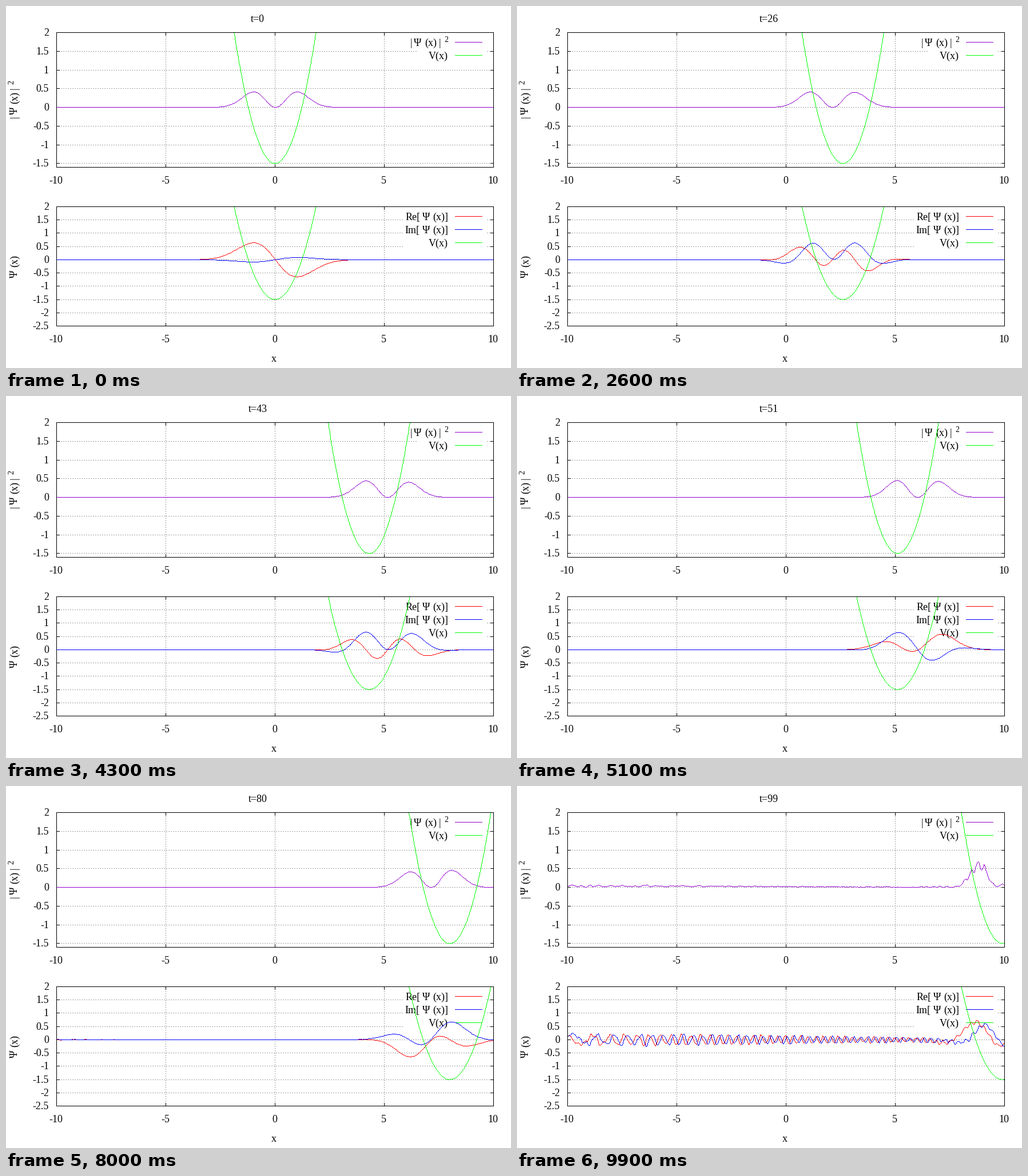
A matplotlib script that plays this animation: 883x634 px, repeating every 10000 ms.

```python
import numpy as np
import matplotlib.pyplot as plt
from matplotlib.animation import FuncAnimation
from matplotlib.colors import to_rgba

W, H, DPI = 883, 634, 64
PX = 72 / DPI                      # one pixel in points
FRAMES, INTERVAL = 100, 100
LEFT, RIGHT = 88, 852
PURPLE, GREEN, RED, BLUE = "#9400d3", "#00ff00", "#ff0000", "#0000ff"
GRID, BLACK = "#a0a0a0", "#000000"

plt.rcParams["font.family"] = "Liberation Serif"


# --- physics: first excited state dragged along by a moving harmonic well ---

N, SPAN, DT, SPEED = 512, 20.0, 0.1, 0.1
x = -SPAN / 2 + SPAN * np.arange(N) / N


def simulate():
    """Split-step evolution, one step per frame."""
    n = np.fft.fftfreq(N, 1 / N)
    n[n < 0] += 1                  # mirrored frequency index N-1-j
    k = 2 * np.pi * n / SPAN
    drift = np.exp(-0.5j * k**2 * DT)
    psi = -np.sqrt(2) * np.pi**-0.25 * x * np.exp(-x**2 / 2) + 0j
    states = []
    for t in range(FRAMES):
        kick = np.exp(-0.25j * (x - SPEED * t)**2 * DT)
        psi = kick * np.fft.ifft(drift * np.fft.fft(kick * psi))
        states.append(psi)
    return states


states = simulate()


# --- hard-edged one-pixel lines on a transparent layer ---

def trace(px, py):
    """Pixels of a polyline, one per step along each segment's longer side."""
    px, py = (np.floor(np.asarray(p) + 0.5) for p in (px, py))
    dx, dy = np.diff(px), np.diff(py)
    steps = np.maximum(np.abs(dx), np.abs(dy)).astype(int)
    seg = np.repeat(np.arange(len(steps)), steps)
    start = np.cumsum(steps) - steps
    frac = (np.arange(len(seg)) - start[seg]) / steps[seg]
    cols = np.append(px[seg] + frac * dx[seg], px[-1])
    rows = np.append(py[seg] + frac * dy[seg], py[-1])
    return (np.floor(cols + 0.5).astype(int),
            np.floor(rows + 0.5).astype(int))


def stroke(layer, px, py, color=BLACK, dashed=False, box=(0, 0, W, H)):
    cols, rows = trace(px, py)
    x0, y0, x1, y1 = box
    keep = (cols >= x0) & (cols < x1) & (rows >= y0) & (rows < y1)
    if dashed:
        keep &= np.arange(len(cols)) % 4 < 2
    layer[rows[keep], cols[keep]] = np.array(to_rgba(color)) * 255


base = np.zeros((H, W, 4), np.uint8)

fig = plt.figure(figsize=(W / DPI, H / DPI), dpi=DPI, facecolor="white")
ax = fig.add_axes([0, 0, 1, 1])
image = ax.imshow(base, extent=(0, W, H, 0), aspect="auto",
                  interpolation="nearest", zorder=3)
ax.axis("off")


def text(px, py, s, ha="left", size=18, rot=0):
    return ax.text(px, py, s, ha=ha, va="baseline", fontsize=size * PX,
                   rotation=rot, rotation_mode="anchor", zorder=2)


def pieces(px, py, parts, rot=0):
    """Place (offset, string, size, rise) parts along a baseline."""
    for off, s, size, rise in parts:
        if rot:
            text(px - rise, py - off, s, size=size, rot=rot)
        else:
            text(px + off, py - rise, s, size=size)


DENSITY = [(1, "|", 18, 0), (7, "Ψ", 18, 0), (26, "(x)", 18, 0),
           (51, "|", 18, 0), (60, "2", 14, 7)]


def to_x(v):
    return LEFT + (v + 10) * (RIGHT - LEFT) / 20


class Panel:
    def __init__(self, top, bottom, ymax, ymin, key_left, colors):
        self.top, self.ymax = top, ymax
        self.scale = (bottom - top) / (ymax - ymin)
        self.inside = (LEFT + 1, top + 1, RIGHT, bottom)
        key_rows = [top + 17 + 23 * i for i in range(len(colors))]
        key_bottom = key_rows[-1] + 12

        for v in np.arange(ymax, ymin - 0.01, -0.5):
            y = self.to_y(v)
            if y < key_bottom:
                stroke(base, [LEFT, key_left], [y, y], GRID, True)
                stroke(base, [841, RIGHT], [y, y], GRID, True)
            else:
                stroke(base, [LEFT, RIGHT], [y, y], GRID, True)
            stroke(base, [LEFT, LEFT + 5], [y, y])
            stroke(base, [RIGHT - 5, RIGHT], [y, y])
            text(75, y + 6, f"{v:g}", ha="right")

        for v in range(-10, 11, 5):
            px = to_x(v)
            stroke(base, [px, px], [bottom, top], GRID, True)
            stroke(base, [px, px], [top, top + 5])
            stroke(base, [px, px], [bottom - 5, bottom])
            text(px - 0.5, bottom + 29, str(v), ha="center")

        for row, color in zip(key_rows, colors):
            stroke(base, [785, 832], [row, row], color)
        stroke(base, [LEFT, RIGHT, RIGHT, LEFT, LEFT],
               [top, top, bottom, bottom, top])

    def to_y(self, v):
        return self.top + (self.ymax - v) * self.scale

    def curve(self, layer, values, color):
        stroke(layer, to_x(x), self.to_y(values), color, box=self.inside)


upper = Panel(46, 282, 2, -1.6, 717, (PURPLE, GREEN))
lower = Panel(351, 560, 2, -2.5, 693, (RED, BLUE, GREEN))

pieces(706, 70, DENSITY)
text(773, 93, "V(x)", ha="right")
for y, name, start in ((375, "Re[", 699), (398, "Im[", 697)):
    text(start, y, name)
    text(728, y, "Ψ")
    text(773, y, "(x)]", ha="right")
text(773, 421, "V(x)", ha="right")

pieces(20, 197, DENSITY, rot=90)
pieces(20, 476, [(0, "Ψ", 18, 0), (19, "(x)", 18, 0)], rot=90)
text(468, 623, "x", ha="center")
title = text(440, 28, "", ha="center")


def draw(t):
    psi = states[t]
    well = (x - SPEED * t)**2 - 1.5
    layer = base.copy()
    upper.curve(layer, np.abs(psi)**2, PURPLE)
    upper.curve(layer, well, GREEN)
    lower.curve(layer, psi.real, RED)
    lower.curve(layer, psi.imag, BLUE)
    lower.curve(layer, well, GREEN)
    image.set_data(layer)
    title.set_text(f"t={t}")
    return image, title


anim = FuncAnimation(fig, draw, frames=FRAMES, interval=INTERVAL,
                     init_func=lambda: draw(0), repeat=True)
plt.show()
```
